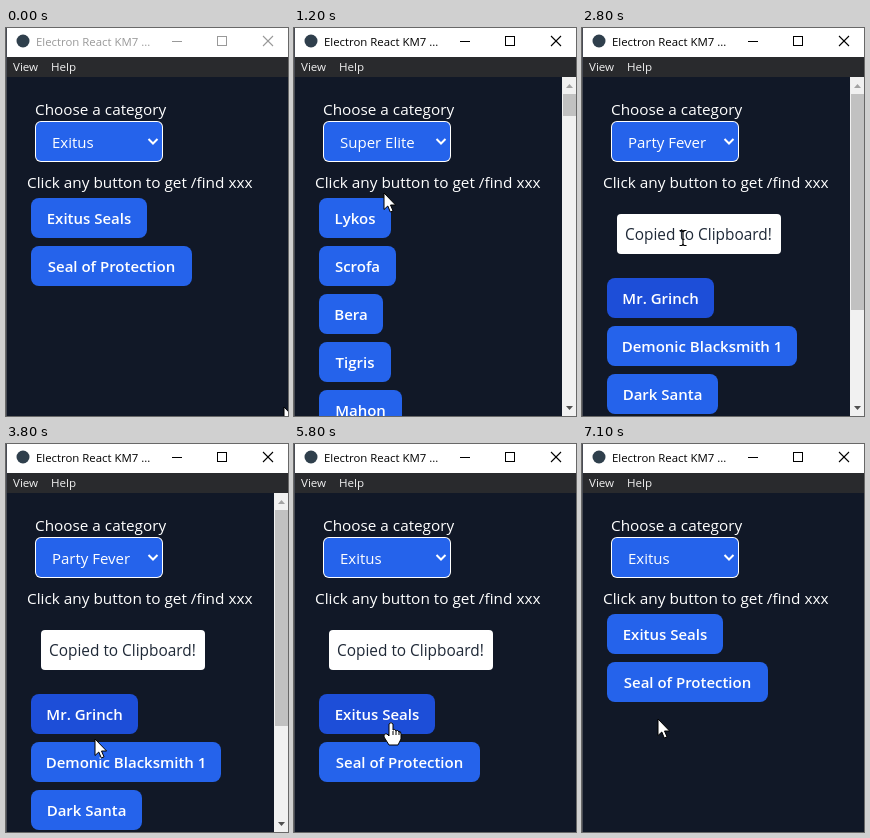
Write an HTML page with a canvas that moves like this. It is 282 by 388 pixels and loops after 7.2 s.

```html
<!DOCTYPE html>
<html lang="en">
<head>
<meta charset="utf-8">
<title>Category finder</title>
<style>
  html, body { margin: 0; width: 100%; height: 100%; overflow: hidden; background: #111827; }
  canvas { display: block; width: 282px; height: 388px; }
</style>
</head>
<body>
<canvas id="stage"></canvas>
<script>
const W = 282, H = 388, LOOP = 7200, STEP = 100;
const FONT = '"Open Sans", "Noto Sans", sans-serif';
const BLUE = '#2563eb', DEEP = '#1d4ed8', PAGE = '#111827';

const canvas = document.getElementById('stage');
const ctx = canvas.getContext('2d');
const dpr = window.devicePixelRatio || 1;
canvas.width = W * dpr;
canvas.height = H * dpr;
ctx.scale(dpr, dpr);

const options = ['Super Elite', 'Party Fever', 'Bounty', 'Exitus', 'Frosthain'];

// Button label and width; thumb gives the scrollbar length without and with the toast.
const categories = {
  'Super Elite': {
    buttons: [['Lykos', 72], ['Scrofa', 77], ['Bera', 64], ['Tigris', 72], ['Mahon', 83]],
    thumb: [22, 22]
  },
  'Party Fever': {
    buttons: [['Mr. Grinch', 107], ['Demonic Blacksmith 1', 190], ['Dark Santa', 111],
      ['Demonic Blacksmith 2', 193], ['Dracula', 87]],
    thumb: [259, 216]
  },
  'Exitus': { buttons: [['Exitus Seals', 116], ['Seal of Protection', 161]] }
};

const ACTIVE_AT = 300;
const choices = [[0, 'Exitus'], [800, 'Super Elite'], [2000, 'Party Fever'], [5200, 'Exitus']];
const menus = [[500, 800], [1600, 2000], [4500, 5200]];
const toasts = [[2700, 4000], [5600, 6900]];

// Pointer path: time, x, y
const path = [
  [0, 278, 379], [300, 160, 210], [500, 105, 118], [700, 92, 147], [900, 90, 150],
  [1200, 90, 165], [1500, 100, 118], [1600, 100, 118], [1900, 95, 169], [2100, 96, 172],
  [2500, 101, 210], [3300, 101, 210], [3800, 89, 295], [4400, 100, 118], [4500, 100, 118],
  [4800, 84, 200], [5000, 85, 213], [5200, 85, 213], [5500, 97, 196], [5600, 97, 198],
  [5800, 97, 279], [6300, 97, 279], [6800, 76, 275], [7200, 76, 275]
];

const within = (spans, t) => spans.some(([a, b]) => t >= a && t < b);

function pointerAt(t) {
  const i = path.findIndex((p, k) => k > 0 && t < p[0]);
  const [t0, x0, y0] = path[i - 1], [t1, x1, y1] = path[i];
  const u = (t - t0) / (t1 - t0), e = u * u * (3 - 2 * u);
  return { x: x0 + (x1 - x0) * e, y: y0 + (y1 - y0) * e };
}

function rect(x, y, w, h, color) {
  ctx.fillStyle = color;
  ctx.fillRect(x, y, w, h);
}

function round(x, y, w, h, r, color) {
  ctx.beginPath();
  ctx.roundRect(x, y, w, h, r);
  ctx.fillStyle = color;
  ctx.fill();
}

function text(str, x, y, size, color, weight = 400, align = 'left') {
  ctx.font = `${weight} ${size}px ${FONT}`;
  ctx.fillStyle = color;
  ctx.textAlign = align;
  ctx.fillText(str, x, y);
}

function line(points, color, width) {
  ctx.beginPath();
  points.forEach(([x, y]) => ctx.lineTo(x, y));
  ctx.strokeStyle = color;
  ctx.lineWidth = width;
  ctx.stroke();
}

function triangle(x, y, dir, color) {
  ctx.beginPath();
  ctx.moveTo(x - 3.5, y + 2 * dir);
  ctx.lineTo(x + 3.5, y + 2 * dir);
  ctx.lineTo(x, y - 2 * dir);
  ctx.fillStyle = color;
  ctx.fill();
}

function drawFrame(active) {
  const ink = active ? '#000' : '#999';
  rect(0, 0, W, 29, '#fff');
  ctx.beginPath();
  ctx.arc(17, 13, 6.5, 0, Math.PI * 2);
  ctx.fillStyle = '#2f3f4c';
  ctx.fill();
  text('Electron React KM7 ...', 30, 18, 11.4, ink);
  rect(166, 13, 10, 1, ink);
  ctx.strokeStyle = ink;
  ctx.lineWidth = 1;
  ctx.strokeRect(211.5, 8.5, 9, 9);
  line([[257, 8], [267, 18]], ink, 1.1);
  line([[267, 8], [257, 18]], ink, 1.1);
  rect(0, 29, W, 20, '#292a2d');
  text('View', 7, 43, 11.6, '#f0f0f0');
  text('Help', 45, 43, 11.6, '#f0f0f0');
}

function drawScrollbar(length) {
  rect(268, 49, 14, H - 49, '#f1f1f1');
  rect(269, 66, 13, length, '#c1c1c1');
  triangle(275.5, 58, 1, '#a3a3a3');
  triangle(275.5, 380, -1, '#505050');
}

function drawSelect(value) {
  round(29, 93, 128, 41, 6, '#fff');
  round(30, 94, 126, 39, 5, BLUE);
  text(value, 46, 120, 15, '#fff');
  line([[142.5, 111], [147, 115.5], [151.5, 111]], '#fff', 2);
}

function drawMenu(p, value) {
  rect(29, 134, 128, 112, '#767676');
  rect(30, 135, 126, 110, BLUE);
  const hovered = Math.floor((p.y - 136) / 22);
  const row = options[hovered] ? hovered : options.indexOf(value);
  rect(30, 136 + row * 22, 126, 22, '#1e90ff');
  options.forEach((name, i) => text(name, 46, 152 + i * 22, 15, '#fff'));
}

function drawToast() {
  round(35, 186, 164, 40, 4, '#fff');
  text('Copied to Clipboard!', 43, 212, 15.4, '#1f2937');
}

function drawArrow({ x, y }) {
  const shape = [[0, 0], [0, 16.5], [3.8, 13], [6.3, 19], [9, 17.8], [6.5, 12], [11.6, 12]];
  ctx.beginPath();
  shape.forEach(([dx, dy]) => ctx.lineTo(x + dx, y + dy));
  ctx.closePath();
  ctx.fillStyle = '#fff';
  ctx.fill();
  ctx.strokeStyle = '#000';
  ctx.lineWidth = 1;
  ctx.stroke();
}

function drawBeam({ x, y }) {
  const parts = [
    [[x - 3.5, y - 7.5], [x - 1, y - 7.5], [x, y - 6.5], [x + 1, y - 7.5], [x + 3.5, y - 7.5]],
    [[x, y - 7], [x, y + 7]],
    [[x - 3.5, y + 7.5], [x - 1, y + 7.5], [x, y + 6.5], [x + 1, y + 7.5], [x + 3.5, y + 7.5]]
  ];
  parts.forEach(p => line(p, '#000', 1.2));
}

function drawHand({ x, y }) {
  ctx.save();
  ctx.translate(x, y);
  ctx.beginPath();
  ctx.moveTo(-2, 13);
  ctx.lineTo(-2, 1);
  ctx.quadraticCurveTo(0, -1.8, 2, 1);
  ctx.lineTo(2, 7);
  ctx.quadraticCurveTo(4, 5.2, 5, 8);
  ctx.quadraticCurveTo(7, 6.2, 8, 9);
  ctx.quadraticCurveTo(10, 7.8, 10, 11);
  ctx.lineTo(10, 16);
  ctx.lineTo(7, 22);
  ctx.lineTo(-2, 22);
  ctx.lineTo(-7, 14);
  ctx.quadraticCurveTo(-7, 10, -4, 11);
  ctx.closePath();
  ctx.fillStyle = '#fff';
  ctx.fill();
  ctx.strokeStyle = '#000';
  ctx.lineWidth = 1;
  ctx.stroke();
  [2, 5, 8].forEach(dx => line([[dx, 8], [dx, 12]], '#000', 1));
  ctx.restore();
}

function render(t) {
  const p = pointerAt(t);
  const value = choices.filter(c => c[0] <= t).pop()[1];
  const { buttons, thumb } = categories[value];
  const open = within(menus, t), toast = within(toasts, t);
  const top = toast ? 250 : 170;
  let onButton = false;

  rect(0, 0, W, H, PAGE);
  text('Choose a category', 29, 87, 15.3, '#fff');
  text('Click any button to get /find xxx', 21, 160, 15.35, '#fff');
  buttons.forEach(([label, w], i) => {
    const y = top + i * 48;
    const hover = !open && p.x > 25 && p.x < 25 + w && p.y >= y && p.y < y + 40;
    onButton = onButton || hover;
    round(25, y, w, 40, 8, hover || (toast && i === 0) ? DEEP : BLUE);
    text(label, 25 + w / 2, y + 26, 15, '#fff', 600, 'center');
  });
  if (toast) drawToast();
  drawSelect(value);
  if (open) drawMenu(p, value);
  if (thumb) drawScrollbar(thumb[+toast]);
  drawFrame(t >= ACTIVE_AT);
  rect(0, 0, 1, H, '#4a4d55');

  const onToast = toast && p.x > 35 && p.x < 199 && p.y > 186 && p.y < 226;
  if (onButton) drawHand(p);
  else if (onToast) drawBeam(p);
  else drawArrow(p);
}

function tick() {
  const t = performance.now() % LOOP;
  render(Math.floor(t / STEP) * STEP);
  requestAnimationFrame(tick);
}
tick();
</script>
</body>
</html>
```
